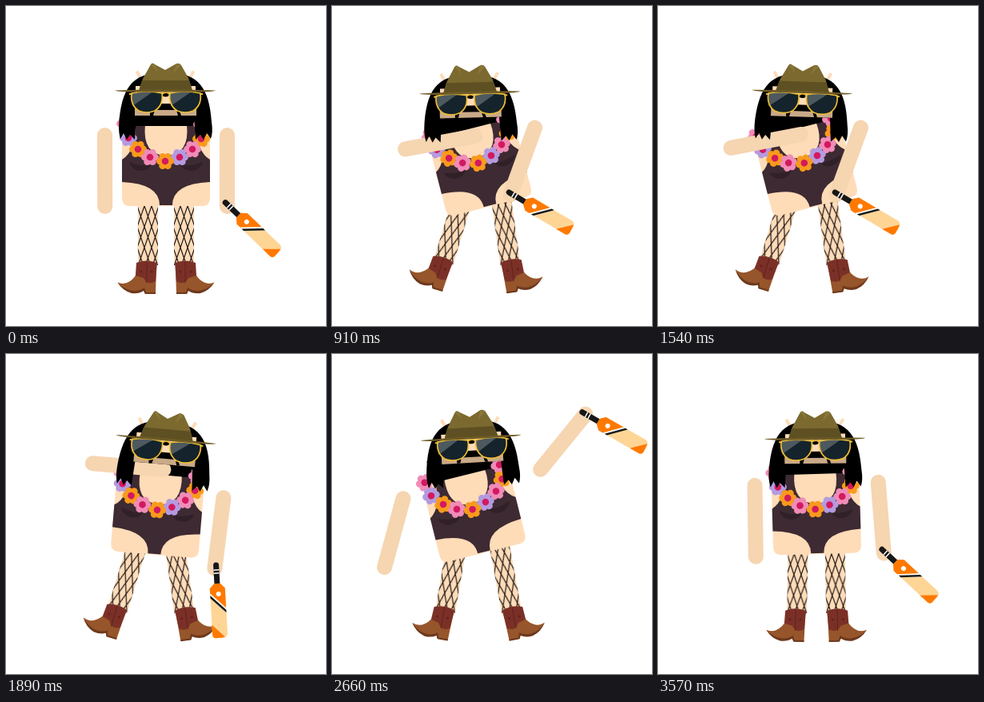
Write an HTML page that moves like this. It is 400x400 px and loops after 3640 ms.

```html
<!DOCTYPE html>
<html lang="en">
<head>
<meta charset="utf-8">
<title>Cricket dancer</title>
<style>
html, body { margin: 0; width: 100%; height: 100%; overflow: hidden; background: #fff; }
svg { display: block; width: 100vw; height: 100vh; }
</style>
</head>
<body>
<svg viewBox="0 0 400 400">
<defs>
  <pattern id="net" x="-4.5" width="9" height="26" patternUnits="userSpaceOnUse">
    <path d="M0 0L9 26M9 0L0 26" fill="none" stroke="#17100f" stroke-width="1.2"/>
  </pattern>
  <g id="leg">
    <path d="M-12.500 -8H12.500V74H-12.500Z" fill="#ffdcb8"/>
    <path d="M-12.500 -8H12.500V74H-12.500Z" fill="url(#net)"/>
    <g transform="translate(-177.500 -250)">
      <path d="M139.500 345.500Q148 349 155 344Q161 340 164 333L188 331 187 359.500H174L172 355Q167 359 157 358Q147 356 139.500 345.500Z" fill="#96552a"/>
      <path d="M139.500 345.500Q148 355 160 356Q168 356 173 352L175 358H187V360H174L172 356Q166 360 157 359Q146 356 139.500 345.500Z" fill="#6d391d"/>
      <path d="M163 321Q176 316 189 321L187 344Q177 350 172 340L162 337Z" fill="#7b3027"/>
      <path d="M176 320V346" stroke="#5f231d" fill="none"/>
      <circle cx="169" cy="332" r="1.500" fill="#5f231d"/><circle cx="182" cy="332" r="1.500" fill="#5f231d"/>
    </g>
  </g>
  <path id="arm" d="M0 0H89" stroke="#f6d5b1" stroke-width="19" stroke-linecap="round"/>
  <g id="lens">
    <path d="M157 109Q176 105 195 109Q197 124 186 131Q176 135 166 131Q155 124 157 109Z" fill="#15232c"/>
    <path d="M158 125L184 107Q170 106 157 109Z" fill="#4d595e"/>
    <path d="M157 109Q176 105 195 109Q197 124 186 131Q176 135 166 131Q155 124 157 109Z" fill="none" stroke="#edbd35" stroke-width="1.700"/>
  </g>
</defs>

<g id="legL"><use href="#leg"/></g>
<g id="legR"><use href="#leg" transform="scale(-1 1)"/></g>

<g id="body"><g transform="translate(-200 -195)">
  <path d="M157 150H243L255 168V240Q255 250 245 250H155Q145 250 145 240V168Z" fill="#ffdcb8"/>
  <path d="M162 148H238Q238 182 255 192V220Q208 222 208 249H192Q192 222 145 220V192Q162 182 162 148Z" fill="#3e2a32"/>
  <path d="M174 148H226Q230 186 200 187Q170 186 174 148Z" fill="#ffdcb8"/>
  <path d="M154 195Q169 201 181 199Q178 206 168 206Q157 205 154 195ZM246 195Q231 201 219 199Q222 206 232 206Q243 205 246 195Z" fill="#302027"/>
  <path d="M158 122H242V150H158Z"/>
  <g id="lei"></g>
</g></g>

<g id="left"><use href="#arm"/></g>

<g id="head"><g transform="translate(-199 -106)">
  <path d="M163.500 81.500L169 92M234.500 81.500L229 92" stroke="#ffdcb8" stroke-width="4"/>
  <path d="M199 84C160 82 144 100 141 150Q141 160 143 166L147 159 151 167 155 161 161 167 163 137H235L237 167 243 161 247 167 251 159 256 166Q259 158 257 145C254 100 238 82 199 84Z"/>
  <path d="M162 100H237V126H162Z" fill="#ffdcb8"/>
  <path d="M161 126H238V137H161Z" fill="#c9a988"/>
  <path d="M180 122H219V129H216L219 137H215L213 130H186L184 137H180Z"/>
  <ellipse cx="199.500" cy="111" rx="4" ry="2.500"/>
  <use href="#lens"/>
  <use href="#lens" transform="translate(48)"/>
  <path d="M195 110Q200 106 205 110M154 110H158M242 110H246" fill="none" stroke="#edbd35" stroke-width="2"/>
  <path d="M166 106L171 91 181 73Q183 70 186 73L199 80 213 72Q217 71 219 74L228 90 233 106Z" fill="#7b692f"/>
  <path d="M181 73L190 83 186 73ZM213 72L209 84 219 74Z" fill="#897638"/>
  <path d="M170 93H229L233 106H166Z" fill="#5e5022"/>
  <path d="M136 105.500Q166 104.500 199 104.500T262 105.500Q260 107.500 235 107.500H164Q140 107.500 136 105.500Z" fill="#6e5b27"/>
</g></g>

<g id="right"><use href="#arm"/></g>

<g id="bat">
  <path d="M3 0H32" stroke="#171717" stroke-width="7" stroke-linecap="round"/>
  <path d="M9 -3.500V3.500M13 -3.500V3.500" stroke="#fff" stroke-width="1.500"/>
  <path d="M26 -4L32 -9.500H89Q94 -9 94 -3V5Q94 9 90 9.500H32L26 4Z" fill="#ffd596"/>
  <path d="M26 -4L32 -9.500H57L38 9.500H32L26 4Z" fill="#ff7900"/>
  <path d="M57 -9.500H63L44 9.500H38Z" fill="#fff"/>
  <path d="M59.500 -9.500H63L44 9.500H40.500Z" fill="#171717"/>
  <path d="M77 9.500L93 -6Q94 -5 94 5Q94 9 90 9.500Z" fill="#ff7900"/>
  <circle cx="39" cy="-1" r="3" fill="#fff"/>
</g>
</svg>

<script>
const $ = id => document.getElementById(id);
const PINK = '#f08cb8', ORANGE = '#f99a1c', PURPLE = '#b49be0';

function flower(x, y, color) {
  let petals = '';
  for (let i = 0; i < 6; i++) {
    const a = i * Math.PI / 3;
    petals += `<circle cx="${x + 6.6 * Math.cos(a)}" cy="${y + 6.6 * Math.sin(a)}" r="4.400"/>`;
  }
  return `<g fill="${color}">${petals}<circle cx="${x}" cy="${y}" r="6"/></g>` +
    `<circle cx="${x}" cy="${y}" r="4.300" fill="#d3195f"/>`;
}
$('lei').innerHTML = [
  [149, 147, PINK], [245, 148, PINK], [153, 165, PURPLE], [244, 166, ORANGE], [165, 179, ORANGE],
  [233, 179, PINK], [180, 189, PINK], [217, 189, PURPLE], [199, 194, ORANGE]
].map(f => flower(...f)).join('');

// Each part: x, y, angle. Bat: grip offset along, grip offset across, angle.
const rest = {
  body: [200, 195, 0], head: [199, 106, 0], legL: [177.5, 250, 0], legR: [222.5, 250, 0],
  left: [123.5, 161.5, 90], right: [276.5, 161.5, 90], bat: [-8, -2, 44]
};
const ready = {
  body: [191, 196, 7.5], head: [203.5, 107.5, 6], legL: [161, 249, 17], legR: [212.5, 249, -8],
  left: [108.5, 136.5, 5], right: [271.5, 179.5, 116.5], bat: [-7, -2.5, 53]
};
const low = { ...ready, body: [190, 196, 5], head: [200, 107, 5], right: [272, 180, 98], bat: [-7, -2, 88] };
const lift = {
  ...ready, body: [181, 196, -15], head: [178, 107, -2],
  left: [77, 173, -18], right: [258, 152, -20], bat: [-7, -2, -95]
};
const hold = {
  ...ready, body: [184, 197, -14.5], head: [172, 108.5, -1.5],
  left: [91.5, 179, -10.5], right: [253.5, 152, 110], bat: [-6, -1.5, 30.5]
};
const hold2 = { ...hold, head: [180, 107.5, 2], left: [91, 177.5, -11] };
const fling = {
  body: [178, 195, -12], head: [178, 104.5, -1], legL: [154.6, 248.4, 10.5], legR: [211, 248.7, -10],
  left: [79, 167, 137.7], right: [263, 155.5, 17], bat: [-8, 0, 30.5]
};
const end = {
  body: [176, 195, -16], head: [169, 105, -5.5], legL: [153.7, 249, 9], legR: [211, 249, -11.5],
  left: [98, 192.5, 81.8], right: [259, 135, -6], bat: [-7, -0.5, 29.5]
};
const wave = {
  ...fling, body: [177, 195, -13.5], head: [174.5, 104.7, -2.8],
  left: [87, 177, 112], right: [261, 147, -60], bat: [-8, 0, 30]
};
const drop = { ...end, body: [176.6, 195, -15], head: [171.7, 105, -4.2], left: [93, 188, 92], right: [260, 139, -33] };
const settle = {
  body: [193, 195, -5], head: [190, 105.7, -1.5], legL: [169.5, 249.7, 3], legR: [219, 249.7, -3],
  left: [116, 170, 87.5], right: [272.5, 158, 76], bat: [-8, -1.5, 41]
};

const keys = [
  [0, rest], [560, ready], [630, low], [770, lift], [910, hold],
  [1190, ready], [1260, low], [1400, lift], [1540, hold2],
  [1820, ready], [1890, low], [2030, lift], [2310, fling],
  [2590, wave], [2800, drop], [3010, end], [3430, settle], [3640, rest]
];
const LOOP = 3640;

function place(id, x, y, angle) {
  $(id).setAttribute('transform', `translate(${x} ${y}) rotate(${angle})`);
}

function draw(now) {
  const t = now % LOOP;
  const i = keys.findIndex(k => k[0] > t);
  const [t0, from] = keys[i - 1], [t1, to] = keys[i];
  const k = (t - t0) / (t1 - t0);
  const pose = {};
  for (const id in rest) pose[id] = from[id].map((v, j) => v + (to[id][j] - v) * k);

  for (const id of ['legL', 'legR', 'body', 'head', 'left', 'right']) place(id, ...pose[id]);

  const [x, y, angle] = pose.right, [along, across, tilt] = pose.bat;
  const a = angle * Math.PI / 180, b = tilt * Math.PI / 180;
  place('bat',
    x + 89 * Math.cos(a) + along * Math.cos(b) - across * Math.sin(b),
    y + 89 * Math.sin(a) + along * Math.sin(b) + across * Math.cos(b), tilt);
}

const start = performance.now();
function tick() {
  draw(performance.now() - start);
  requestAnimationFrame(tick);
}
tick();
</script>
</body>
</html>
```
